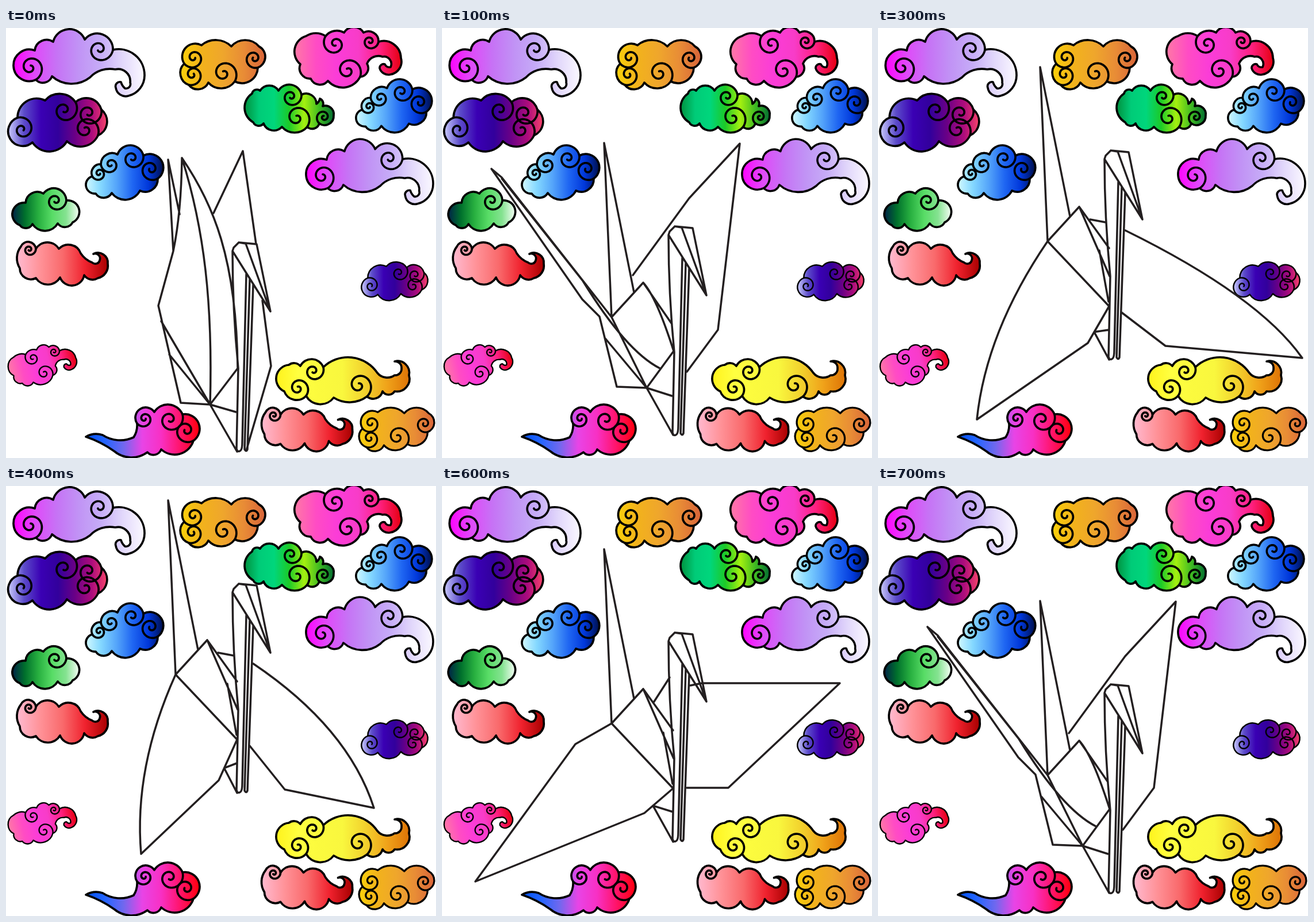
Write an HTML page with a canvas that moves like this. It is 748x748 px and loops after 800 ms.

```html
<!DOCTYPE html>
<html lang="en">
<head>
<meta charset="utf-8">
<title>Paper crane</title>
<style>
html, body { margin: 0; width: 100%; height: 100%; overflow: hidden; background: #fff; }
canvas { display: block; width: 100vw; height: 100vh; }
</style>
</head>
<body>
<canvas id="stage" width="748" height="748"></canvas>
<script>
const SIZE = 748, STEP = 100, TAU = Math.PI * 2;
const ctx = document.getElementById('stage').getContext('2d');

// edge: clockwise cusps "x y [sagitta] [curl]"; "<" curls the arc inward at its
// start, ">" at its end. copy: where the first cusp lands, scale, rotation.
const clouds = [
  {
    span: [12, 241], copy: [559.7, 278.6, .97],
    fill: '#f0f #e04af9 #c673f5 #c193f5 #c6acf7 #e2d8fb #fbf9ff',
    edge: '52 90 38 <, 50 39, 82 24 20, 137 20 19 >, 186 38 17, 241 82 8, 213 118 6, 191 104 4, 200 94 -1, 207 105 -4, 216 95 -9, 190 72 -6, 146 86 12, 80 84'
  },
  {
    span: [2, 179], copy: [646.7, 463.6, .67],
    fill: '#d0d2ff #5c4cca #3a00b4 #32009c #6a0086 #ad0c7c #ff4a68',
    edge: '46 199 30 >, 20 156, 68 126 13 >, 121 129 >, 166 142, 160 187 14 <, 106 197'
  },
  {
    span: [304, 450], copy: [627.3, 729.4, .885],
    fill: '#fbd00a #f2b21c #efa62c #e88c36 #d96539',
    edge: '318 99 <, 310 62 17 <, 340 30 10, 392 32 11, 440 32 12 >, 438 69, 398 93 11 <, 352 95'
  },
  {
    span: [502, 687], copy: [13.5, 604.8, .64, -.22],
    fill: '#ff78a6 #ff4cc4 #fb3cd8 #f83cc8 #ff2080 #e60012',
    edge: '512 63 15, 522 14 5, 556 14 6 <, 588 8, 622 8 9 >, 648 24 12, 687 52 8, 668 81 4, 650 70 3, 659 63 -2, 669 68 -7, 655 50 -6, 628 62, 616 85 15 <, 560 92, 530 88'
  },
  {
    span: [414, 571],
    fill: '#008f3c #00cb78 #00d67c #1cca28 #a4f010 #3fbb22 #006a32',
    edge: '430 164 14, 428 114, 442 109, 474 109 14 >, 514 116, 540 132 -1, 546 123 3, 551 136, 570 152 9 >, 545 166, 524 172 10 <, 480 172, 448 166'
  },
  {
    span: [137, 276], copy: [625.5, 171.3, .98],
    fill: '#d8fbff #84d8ff #54a4fa #1f66f2 #0037da #000c3c',
    edge: '156 288 14, 150 258 <, 165 237 <, 194 220 17 >, 239 222 22 >, 264 262, 233 283, 184 287'
  },
  {
    span: [9, 128],
    fill: '#001c4a #00702c #28b040 #58dc66 #84e290 #f8fff8',
    edge: '24 343 18, 34 304, 65 288 15 >, 105 300 17, 116 338, 90 340, 46 341'
  },
  {
    span: [20, 177], copy: [449.5, 706.5, 1],
    fill: '#ffb9cf #ff9298 #f96a6c #f0222e #a80000',
    edge: '24 418 6, 26 380 10 >, 52 384, 92 384, 130 392 -2, 150 408 -4, 163 404 -5, 152 393 9, 177 410 6, 160 435 5, 136 430 16, 94 434, 52 435'
  },
  {
    span: [470, 701],
    fill: '#fff31c #ffff40 #fbfa3e #f9f73e #f2d22e #f0a31a #de7406',
    edge: '484 632 18, 492 586 4, 512 588 13 >, 552 590 22, 646 600 -6, 676 604 -4, 688 592 -4, 676 580, 701 604, 676 632, 655 632, 628 641 9 <, 570 643 13, 522 640 <'
  },
  {
    span: [139, 335],
    fill: '#0050f0 #2465ff #7068ee #e844e6 #f830c4 #ff146c #ff0010',
    edge: '139 711 3, 168 708 -7, 222 712 -2, 228 688 18 <, 258 668 15 >, 307 672 20 >, 326 718 16, 270 733, 246 738 10, 188 736 -2'
  }
];

function readEdge(text) {
  const pts = text.split(',').map(row => {
    const [x, y, ...rest] = row.trim().split(' ');
    const sag = rest.find(v => !isNaN(v));
    return { x: +x, y: +y, sag: sag && +sag, curl: rest.find(v => v === '<' || v === '>') };
  });
  return pts.map((p, i) => {
    const q = pts[(i + 1) % pts.length];
    const chord = Math.hypot(q.x - p.x, q.y - p.y), half = chord / 2;
    const sag = p.sag || .28 * chord, h = Math.abs(sag);
    return { p, q, chord, sag, large: h > half, r: (half * half + h * h) / (2 * h) };
  });
}

function outlineOf(arcs) {
  const d = arcs.map(({ q, r, large, sag }) => `A${r} ${r} 0 ${+large} ${+(sag > 0)} ${q.x} ${q.y}`);
  return new Path2D(`M${arcs[0].p.x} ${arcs[0].p.y}${d.join('')}Z`);
}

// continues an arc past its end as a tightening spiral
function curlOf({ p, q, chord, sag, r }) {
  const path = new Path2D(), n = 60;
  const inset = (r - sag) / chord;
  const cx = (p.x + q.x) / 2 - (q.y - p.y) * inset, cy = (p.y + q.y) / 2 + (q.x - p.x) * inset;
  const end = p.curl === '>' ? q : p, dir = p.curl === '>' ? 1 : -1;
  const a0 = Math.atan2(end.y - cy, end.x - cx), r0 = Math.min(.85 * r, 24);
  const ox = end.x - r0 * Math.cos(a0), oy = end.y - r0 * Math.sin(a0);
  for (let i = 0; i <= n; i++) {
    const t = i / n, a = a0 + dir * 1.4 * TAU * t;
    const k = r0 * (.15 + .85 * (1 - t) ** 1.4);
    path.lineTo(ox + k * Math.cos(a), oy + k * Math.sin(a));
  }
  return path;
}

function paintSky() {
  const sky = document.createElement('canvas');
  sky.width = sky.height = SIZE;
  const g = sky.getContext('2d');
  g.fillStyle = '#fff';
  g.fillRect(0, 0, SIZE, SIZE);
  g.lineJoin = g.lineCap = 'round';
  g.lineWidth = 3.7;
  for (const { span, fill, edge, copy } of clouds) {
    const arcs = readEdge(edge), { x: hx, y: hy } = arcs[0].p;
    const outline = outlineOf(arcs), curls = arcs.filter(a => a.p.curl).map(curlOf);
    const grad = g.createLinearGradient(span[0], 0, span[1], 0);
    fill.split(' ').forEach((c, i, all) => grad.addColorStop(i / (all.length - 1), c));
    for (const [x, y, scale, turn = 0] of [[hx, hy, 1], copy].filter(Boolean)) {
      g.save();
      g.translate(x, y);
      g.rotate(turn);
      g.scale(scale, scale);
      g.translate(-hx, -hy);
      g.fillStyle = grad;
      g.fill(outline);
      g.stroke(outline);
      curls.forEach(c => g.stroke(c));
      g.restore();
    }
  }
  return sky;
}

const neck = 'M394 228L396 222L405 213L436 216L460 333ZM405 213L417 215L460 333' +
  'M394 228Q394 330 404 432L401 572Q403 579 408 575Q411 573 411 560L418 268' +
  'M424 277L415 573Q418 578 420 573L430 286';
const tail = 'M334 328L282 68L295 371L350 311';
const chest = 'M295 371L402 484M350 311L402 383M350 311L403 432M385 387L401 476';

// open wings hang from fixed joints; bend is Q for curved or L for creased
function open(shift, bend, left, right, root, foot) {
  const [knee, belly] = [left[2], [402, 484]];
  const rump = knee.map((v, i) => v + .3 * (belly[i] - v));
  const d = `M295 371${bend}${left[0]} ${left[1]}L${knee}L${belly}` +
    `M${root}${bend}${right[0]} ${right[1]}L${right[2]}L${foot}` +
    `M402 525L${rump}L402 577M369 333L396 ${root[1] - 14}`;
  return { shift, path: new Path2D(neck + tail + chest + d) };
}

const folded = {
  shift: 160,
  path: new Path2D(neck + 'M302 164L282 69L291 228M306 66Q305 160 291 228L265 323L304 492L355 495' +
    'M306 66C345 190 360 320 355 495M306 66C360 145 401 240 403 432L355 495' +
    'M270 350L355 495M284 408L355 495L400 508M355 495L402 577' +
    'M361 162L412 54L435 216M446 314L461 428L418 575')
};
const raised = {
  shift: 132,
  path: new Path2D(neck + tail + 'M350 311L400 383M350 311Q373 336 403 430L356 494M295 371L356 494' +
    'M86 113L244 340L274 370L304 492L356 494M86 113L104 128L295 371' +
    'M104 130L245 308Q320 430 379 460M284 408L356 494L400 508M356 494L402 576' +
    'M332 298L430 164L518 69L480 393L426 466')
};
const level = open(42, 'L',
  [[232, 407], [58, 646], [352, 527]], [[452, 301], [692, 301], [498, 483]], [432, 305], [426, 483]);
const lowered = open(0, 'Q',
  [[188, 528], [172, 681], [365, 548]], [[662, 466], [738, 574], [500, 553]], [430, 352], [424, 495]);
const lowest = open(-43, 'Q',
  [[222, 533], [235, 683], [370, 555]], [[595, 463], [640, 603], [485, 571]], [430, 352], [424, 495]);

const cycle = [folded, raised, level, lowered, lowest, lowered, level, raised];
const sky = paintSky();

function draw(time) {
  const pose = cycle[Math.floor(time / STEP) % cycle.length];
  ctx.drawImage(sky, 0, 0);
  ctx.save();
  ctx.translate(0, pose.shift);
  ctx.strokeStyle = '#231f20';
  ctx.lineWidth = 3.5;
  ctx.lineJoin = ctx.lineCap = 'round';
  ctx.stroke(pose.path);
  ctx.restore();
}

let start;
function tick(now) {
  if (start === undefined) start = now;
  draw(now - start);
  requestAnimationFrame(tick);
}
draw(0);
requestAnimationFrame(tick);
</script>
</body>
</html>
```
